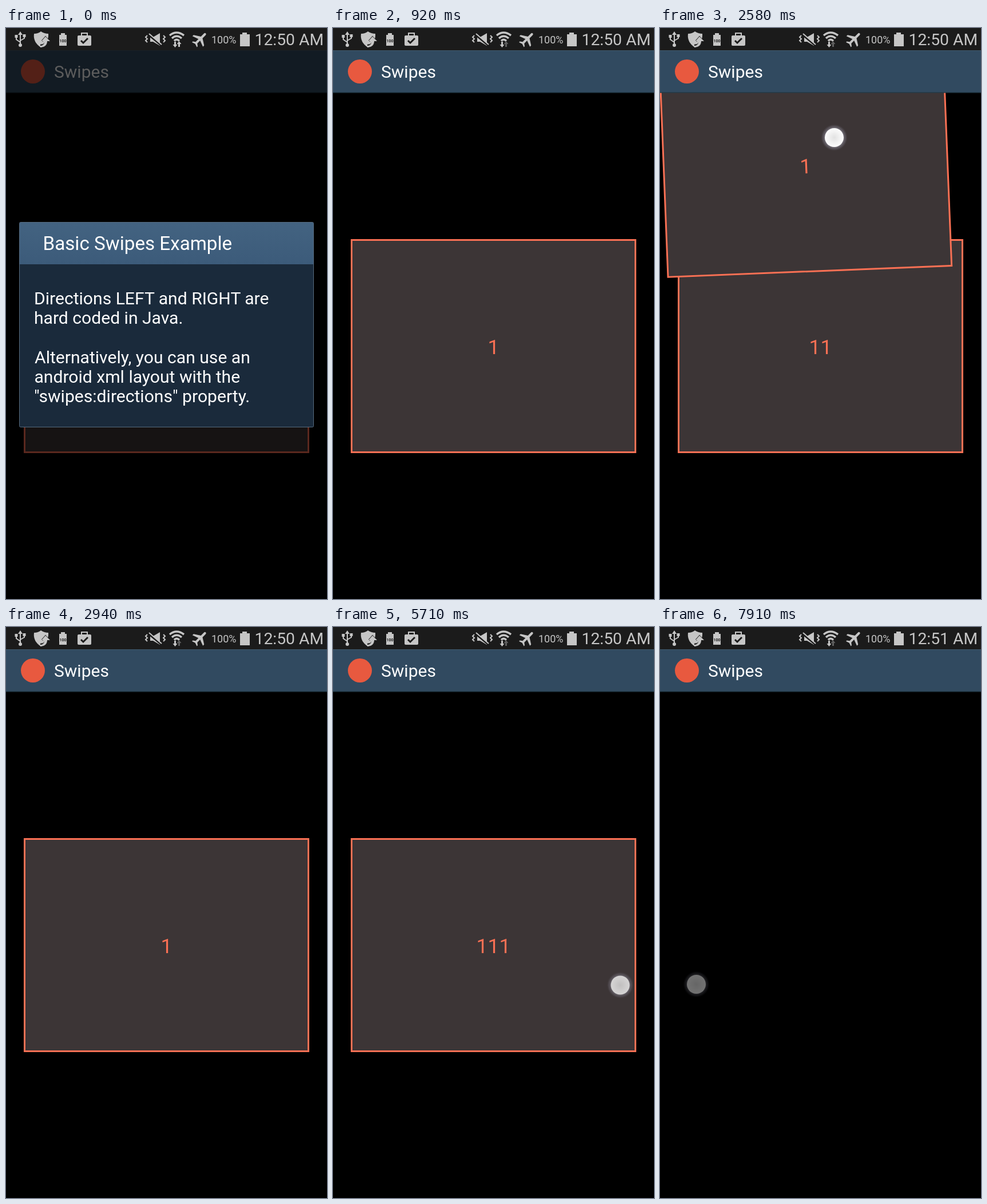
These frames come from a looping animation (561 px wide and 998 px high, 8000 ms). An HTML page:

```html
<!DOCTYPE html>
<html lang="en">
<head>
<meta charset="utf-8">
<title>Swipes</title>
<style>
  html, body { margin: 0; width: 100%; height: 100%; overflow: hidden; background: #000; }
  svg { display: block; width: 100%; height: 100%; font-family: Roboto, sans-serif; }
  .card rect { fill: #3c3536; stroke: #fa7054; stroke-width: 3; }
  .card text { fill: #fa7054; font-size: 35.5px; text-anchor: middle; }
  .icons { fill: #c6c6c6; stroke: none; }
  .line { fill: none; stroke: #c6c6c6; stroke-width: 2; }
  .arcs { fill: none; stroke: #c6c6c6; stroke-width: 3.5; }
  .cut { fill: none; stroke: #1b1b1b; stroke-width: 3; }
</style>
</head>
<body>
<svg viewBox="0 0 561 998">
  <defs>
    <linearGradient id="header" x2="0" y2="1">
      <stop stop-color="#436381"/><stop offset="1" stop-color="#3c5b7a"/>
    </linearGradient>
    <radialGradient id="glow">
      <stop offset=".68" stop-color="#dcdcf0" stop-opacity=".4"/>
      <stop offset="1" stop-color="#b0b0d0" stop-opacity="0"/>
    </radialGradient>
    <radialGradient id="disc">
      <stop stop-color="#e2e2e2"/><stop offset="1" stop-color="#fdfdfd"/>
    </radialGradient>
    <clipPath id="content"><rect y="113" width="561" height="885"/></clipPath>
  </defs>
  <rect width="561" height="998"/>

  <g clip-path="url(#content)">
    <g class="card" id="under">
      <rect x="32.5" y="370.5" width="496" height="371"/><text x="280.5" y="570"></text>
    </g>
    <g class="card" id="top">
      <rect x="32.5" y="370.5" width="496" height="371"/><text x="280.5" y="570"></text>
    </g>
  </g>

  <rect y="39" width="561" height="74" fill="#314a60"/>
  <rect y="39" width="561" height="1" fill="#405a6f"/>
  <rect y="112" width="561" height="1.5" fill="#233a48"/>
  <circle cx="47" cy="76" r="21" fill="#e8593f"/>
  <text x="84" y="87" font-size="30" fill="#fff">Swipes</text>

  <rect id="dim" y="39" width="561" height="959"/>
  <g id="dialog">
    <rect x="23.5" y="339.5" width="514" height="358" rx="2" fill="#1a2a3b" stroke="#566a7e"/>
    <rect x="24" y="340" width="513" height="73" fill="url(#header)"/>
    <g fill="#fff" font-size="30.1">
      <text x="64.500" y="387.5" font-size="33.2">Basic Swipes Example</text>
      <text x="49" y="483">Directions LEFT and RIGHT are</text>
      <text x="49" y="517">hard coded in Java.</text>
      <text x="50" y="586">Alternatively, you can use an</text>
      <text x="49.500" y="620">android xml layout with the</text>
      <text x="49" y="654">"swipes:directions" property.</text>
    </g>
  </g>

  <rect width="561" height="39" fill="#1b1b1b"/>
  <g class="icons">
    <!-- USB -->
    <path class="line" d="M25 10V30M25 25L18 20V15M25 22L32 18V14"/>
    <path d="M25 6l4 6h-8zM15.500 12h5v5h-5zM29.500 11h5v5h-5z"/><circle cx="25" cy="30" r="3"/>
    <!-- shield -->
    <path d="M61 6Q67 10 74 10Q75 25 61 34Q47 25 49 10Q56 10 61 6Z"/>
    <path class="cut" d="M60 30Q69 31 69 21M63 23L69 16L75 23"/>
    <path d="M60 31Q67 31 67 23H62L69 15L77 23H72Q72 33 60 34Z"/>
    <!-- small battery -->
    <path d="M96 9h7v3h3v19h-13v-19h3z"/>
    <text x="99.500" y="25" font-size="7" font-weight="700" text-anchor="middle" fill="#1b1b1b">100</text>
    <!-- checked case -->
    <path d="M127 13h20q2 0 2 2v14q0 2-2 2h-20q-2 0-2-2v-14q0-2 2-2z"/>
    <path class="line" d="M132 13V9H142V13"/>
    <path class="cut" d="M131 22L135 26L143 18"/>
    <!-- muted vibration -->
    <path d="M252 16h5l12-7v22l-12-7h-5z"/>
    <path class="cut" d="M249 12L272 31"/>
    <path class="line" d="M250 10L272 29M247 13l-3 3l3 3l-3 3l3 3M275 13l3 3l-3 3l3 3l-3 3"/>
    <!-- wifi -->
    <path class="arcs" d="M286 13Q298 3 311 13M290 18Q298 10.500 307 18M294 22.500Q298 18 303 22.500"/>
    <path d="M294 24h3v5h2.500l-4 5l-4-5h2.500z"/>
    <path id="uplink" d="M301 33v-5h-2.500l4-5l4 5h-2.500v5z"/>
    <!-- plane -->
    <path transform="translate(338.500 20) rotate(45)" d="M0-15q2 0 2 3v7l11 7v3l-11-4v7l4 3v2l-6-2l-6 2v-2l4-3v-7l-11 4v-3l11-7v-7q0-3 2-3z"/>
    <text x="359" y="27" font-size="18">100%</text>
    <path d="M413 8h8v3h5v21h-17v-21h4z"/>
    <text id="clock" x="434.500" y="30" font-size="28.3"></text>
  </g>

  <g id="dot">
    <circle r="23" fill="url(#glow)"/><circle r="16.500" fill="url(#disc)"/>
  </g>
</svg>
<script>
const LOOP = 8000, TICK = 92;
const el = id => document.getElementById(id);
const ROTATION = 0.0875; // degrees per pixel dragged

// Card offsets per tick; the dot follows them, then rests at its release point and fades.
const fling = (start, press, release, card) => {
  const nudge = [Math.sign(card[0]) * 3, 0];
  return {
    start, press, length: 6, gone: 3,
    path: [[0, 0], nudge, card],
    dot: [[0, 0], nudge, release]
  };
};
const dragPath = [[0, 0], [4, -30], [15, -170], [-26, -316], [-24, -290], [-5, -60], [0, 0]];
const gestures = [
  { start: 25, press: [330.5, 507.5], length: 7, path: dragPath, dot: dragPath.slice(0, 5), gone: Infinity },
  fling(43, [488, 600], [-426, 34], [-380, 35]),
  fling(58, [76, 602], [426, 24], [380, 30]),
  fling(81, [492.5, 593.5], [-429, 31], [-380, 29])
];
const labels = ['1', '11', '111'];
const fade = [1, 1, 0.85, 0.5, 0.2, 0];
const last = (list, i) => list[Math.min(i, list.length - 1)];

function setCard(id, label, [x, y] = [0, 0]) {
  const card = el(id);
  card.style.display = label ? '' : 'none';
  card.lastElementChild.textContent = label || '';
  card.setAttribute('transform', `translate(${x} ${y}) rotate(${x * ROTATION} 280.5 556)`);
}

function draw(time) {
  const tick = Math.floor((time % LOOP + 5) / TICK);
  const swiped = gestures.filter(g => tick >= g.start + g.gone).length;
  const gesture = gestures.find(g => tick >= g.start && tick < g.start + g.length);
  const step = gesture ? tick - gesture.start : 0;
  const moving = gesture && step < gesture.gone;

  setCard('under', labels[swiped + 1]);
  setCard('top', labels[swiped], moving ? last(gesture.path, step) : [0, 0]);

  const dot = el('dot');
  dot.style.display = gesture ? '' : 'none';
  if (gesture) {
    const [x, y] = last(gesture.dot, step);
    dot.setAttribute('transform', `translate(${gesture.press[0] + x} ${gesture.press[1] + y})`);
    dot.style.opacity = [0.45, 0.8][gesture.length - 1 - step] ?? 1;
  }

  const shown = last(fade, Math.max(0, tick - 5));
  el('dialog').style.opacity = shown;
  el('dim').style.opacity = 0.64 * shown;
  el('uplink').style.opacity = tick < 5 ? 1 : 0.4;
  el('clock').textContent = tick < 69 ? '12:50 AM' : '12:51 AM';
}

const begin = performance.now();
function frame() {
  draw(performance.now() - begin);
  requestAnimationFrame(frame);
}
frame();
</script>
</body>
</html>
```
